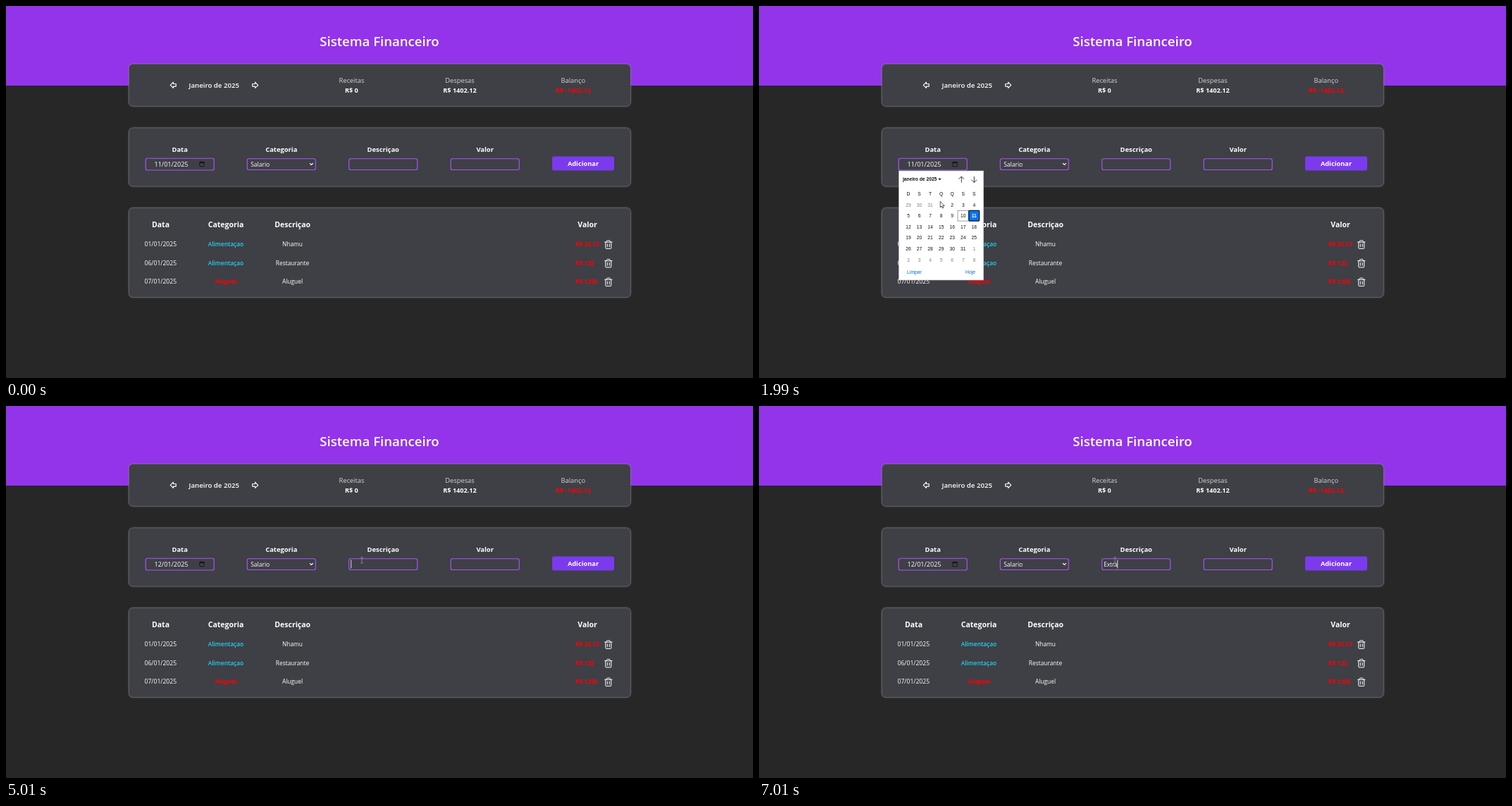
Recreate the animation shown at these times as an HTML page. Size 1060 by 528 pixels, loop 8000 ms.

```html
<!DOCTYPE html>
<html lang="pt">
<head>
<meta charset="utf-8">
<title>Sistema Financeiro</title>
<style>
html, body { margin: 0; width: 100%; height: 100%; overflow: hidden; background: #272727; }
svg { display: block; width: 100%; height: 100%; font-family: "Open Sans", "Noto Sans", sans-serif; }
.card { fill: #3f3f46; stroke: #a0a0a0; stroke-opacity: .4; stroke-width: .8; filter: drop-shadow(0 0 1.2px rgba(150, 150, 150, .6)); }
.field { fill: none; stroke: #a855f7; stroke-width: 1.15; }
.line { fill: none; stroke: #fff; stroke-linejoin: round; stroke-linecap: round; }
.picker { font-family: "Liberation Sans", Arial, sans-serif; }
.pointer { fill: #fff; stroke: #111; stroke-width: .7; stroke-linejoin: round; }
</style>
</head>
<body>
<svg id="stage" viewBox="0 0 1060 528"></svg>
<script>
const stage = document.getElementById('stage');
const LOOP = 8000;
const scenes = [];

function add(tag, attrs, parent = stage) {
  const node = document.createElementNS('http://www.w3.org/2000/svg', tag);
  for (const key in attrs) node.setAttribute(key, attrs[key]);
  parent.appendChild(node);
  return node;
}

function rect(x, y, width, height, attrs, parent) {
  return add('rect', { x, y, width, height, ...attrs }, parent);
}

function path(d, attrs, parent) {
  return add('path', { d, ...attrs }, parent);
}

function text(str, x, y, size, { weight = 400, fill = '#fff', anchor = 'middle' } = {}, parent) {
  add('text', { x, y, 'font-size': size, 'font-weight': weight, fill, 'text-anchor': anchor }, parent).textContent = str;
}

// A group that is visible only between two moments of the loop.
function scene(from, to, attrs = {}) {
  const node = add('g', attrs);
  scenes.push({ node, from, to });
  return node;
}

function pointer(x, y, parent) {
  path('M0 0V8.6L2 6.8L3.3 9.7L4.6 9.1L3.4 6.3H6Z', { class: 'pointer', transform: `translate(${x} ${y})` }, parent);
}

const bold = { weight: 700 };
const red = { weight: 700, fill: '#ff0000' };
const cyan = { weight: 600, fill: '#22d3ee' };

function drawSummary() {
  rect(0, 0, 1060, 113, { fill: '#9333ea' });
  text('Sistema Financeiro', 530, 57, 18.6, { weight: 600 });
  rect(174.3, 82.3, 712, 60, { rx: 6, class: 'card' });

  const arrow = 'M-4.2 0L0 -4.1V-1.8H3.8V1.8H0V4.1Z';
  path(arrow, { class: 'line', 'stroke-width': 1.15, transform: 'translate(237.4 112.3)' });
  path(arrow, { class: 'line', 'stroke-width': 1.15, transform: 'translate(353.5 112.3) scale(-1 1)' });
  text('Janeiro de 2025', 295.3, 116, 9.66, { weight: 600 });

  [['Receitas', 'R$ 0', 490.4, bold], ['Despesas', 'R$ 1402.12', 644, bold], ['Balanço', 'R$ -1402.12', 804.8, red]]
    .forEach(([label, value, x, style]) => {
      text(label, x, 109.3, 9.3, { fill: '#d4d4d8' });
      text(value, x, 123.3, 9.1, style);
    });
}

function drawForm() {
  rect(174.3, 173, 712, 83, { rx: 6, class: 'card' });
  [['Data', 246.7], ['Categoria', 390.8], ['Descriçao', 535.2], ['Valor', 679.7]].forEach(([label, x], i) => {
    text(label, x, 207.2, 9.4, bold);
    rect(x - 48.5, i ? 216.7 : 216.2, 97, i ? 15.8 : 16.8, { rx: 2.6, class: 'field' });
  });

  path('M274.8 221.8H281.2V227.7H274.8ZM276.3 220.5V222M279.7 220.5V222', { fill: 'none', stroke: '#111', 'stroke-width': .8 });
  rect(274.8, 221.6, 6.4, 1.5, { fill: '#111' });
  text('Salario', 347.2, 228, 8.5, { anchor: 'start' });
  path('M431.3 223.3L433.4 225.5L435.5 223.3', { class: 'line', 'stroke-width': 1.1 });

  rect(775, 213.4, 88, 20, { rx: 2.6, fill: '#7c3aed' });
  text('Adicionar', 819, 227.1, 9.25, bold);
}

function drawTable() {
  rect(174.3, 286.5, 712, 127, { rx: 6, class: 'card' });
  [['Data', 219.5], ['Categoria', 312], ['Descriçao', 406.7], ['Valor', 825]]
    .forEach(([label, x]) => text(label, x, 314.2, 10.5, bold));

  [['01/01/2025', 'Alimentaçao', 'Nhamu', 'R$ 32.12', cyan],
   ['06/01/2025', 'Alimentaçao', 'Restaurante', 'R$ 120', cyan],
   ['07/01/2025', 'Aluguel', 'Aluguel', 'R$ 1250', red]].forEach(([date, category, name, value, style], i) => {
    const y = 341.1 + i * 26.6;
    text(date, 219.3, y, 8.6);
    text(category, 311.9, y, 8.35, style);
    text(name, 406.5, y, 8.4);
    text(value, 808, y, 8.4, { ...red, anchor: 'start' });
    path('M-5.2 -3.6H5.2M-2.4 -3.6V-4.8Q-2.4 -5.8 -1.4 -5.8H1.4Q2.4 -5.8 2.4 -4.8V-3.6M-4 -3.6V4.8Q-4 5.7 -3.1 5.7H3.1Q4 5.7 4 4.8V-3.6M-1.5 -1V3.1M1.5 -1V3.1',
      { class: 'line', 'stroke-width': 1, transform: `translate(854.8 ${y - 2.4})` });
  });
}

function drawPicker(parent) {
  const dark = '#101010';
  rect(198.3, 234, 120.4, 155, { fill: '#fff', stroke: '#bbb', 'stroke-width': .6 }, parent);
  text('janeiro de 2025', 204, 248.2, 6.7, { weight: 700, fill: dark, anchor: 'start' }, parent);
  path('M254.3 244.8H258.7L256.5 247.2Z', { fill: dark }, parent);
  path('M287.3 250.5V242M283.5 245.8L287.3 242L291.1 245.8M305.3 242V250.5M301.5 246.7L305.3 250.5L309.1 246.7',
    { fill: 'none', stroke: '#222', 'stroke-width': .9 }, parent);

  const column = i => 212 + i * 15.55;
  [...'DSTQQSS'].forEach((day, i) => text(day, column(i), 268.6, 6.7, { fill: dark }, parent));
  rect(282, 290.3, 15, 14.8, { fill: 'none', stroke: '#888', 'stroke-width': .8 }, parent);
  rect(297.8, 290.3, 14.8, 14.8, { rx: .8, fill: '#0075ff', stroke: dark, 'stroke-width': 1.2 }, parent);

  for (let i = 0; i < 42; i++) {
    const offset = i - 2;
    const inMonth = offset > 0 && offset <= 31;
    const day = inMonth ? offset : offset < 1 ? offset + 31 : offset - 31;
    const chosen = offset === 11;
    text(day, column(i % 7), 284.7 + Math.floor(i / 7) * 15.57, 6.7,
      { fill: chosen ? '#fff' : inMonth ? dark : '#808080', weight: chosen ? 700 : 400 }, parent);
  }
  text('Limpar', 220.5, 379.6, 6.8, { fill: '#0070d0' }, parent);
  text('Hoje', 300, 379.6, 6.8, { fill: '#0070d0' }, parent);
}

function drawOptions(parent) {
  rect(342, 234, 99, 62, { fill: '#3f3f46', stroke: '#777', 'stroke-width': .6 }, parent);
  rect(342.4, 234.4, 98.2, 12.2, { fill: '#1967d2' }, parent);
  ['Salario', 'Alimentaçao', 'Aluguel', 'Lazer', 'Outros'].forEach((name, i) =>
    text(name, 345, 243.5 + i * 12.3, 8.5, { anchor: 'start' }, parent));
}

function drawTyping(str, caretX, from, to) {
  const group = scene(from, to);
  text(str, 489.2, 228, 8.2, { anchor: 'start' }, group);
  rect(caretX, 218.6, .8, 11.8, { fill: '#fff' }, group);
}

drawSummary();
drawForm();
drawTable();

text('11/01/2025', 234.5, 228, 9.06, {}, scene(0, 2990));
text('12/01/2025', 234.5, 228, 9.06, {}, scene(2990, LOOP));

pointer(343.4, 161.3, scene(1000, 1990));
const picker = scene(1990, 2990, { class: 'picker' });
drawPicker(picker);
pointer(257.2, 277.3, picker);
pointer(385.3, 231.3, scene(2990, 4010));
const options = scene(4010, 5010);
drawOptions(options);
pointer(385.3, 226.3, options);

drawTyping('', 489.4, 5010, 6010);
drawTyping('E', 494, 6010, 7010);
drawTyping('Extra', 508.4, 7010, LOOP);
path('M503 214.8H504.4L505 215.3L505.6 214.8H507M505 215.3V222.3M503 222.8H504.4L505 222.3L505.6 222.8H507',
  { fill: 'none', stroke: '#a3a3a8', 'stroke-width': .7 }, scene(5010, LOOP));

const start = performance.now();
function render() {
  const time = (performance.now() - start) % LOOP;
  for (const { node, from, to } of scenes) {
    node.style.display = time >= from && time < to ? '' : 'none';
  }
  requestAnimationFrame(render);
}
render();
</script>
</body>
</html>
```
